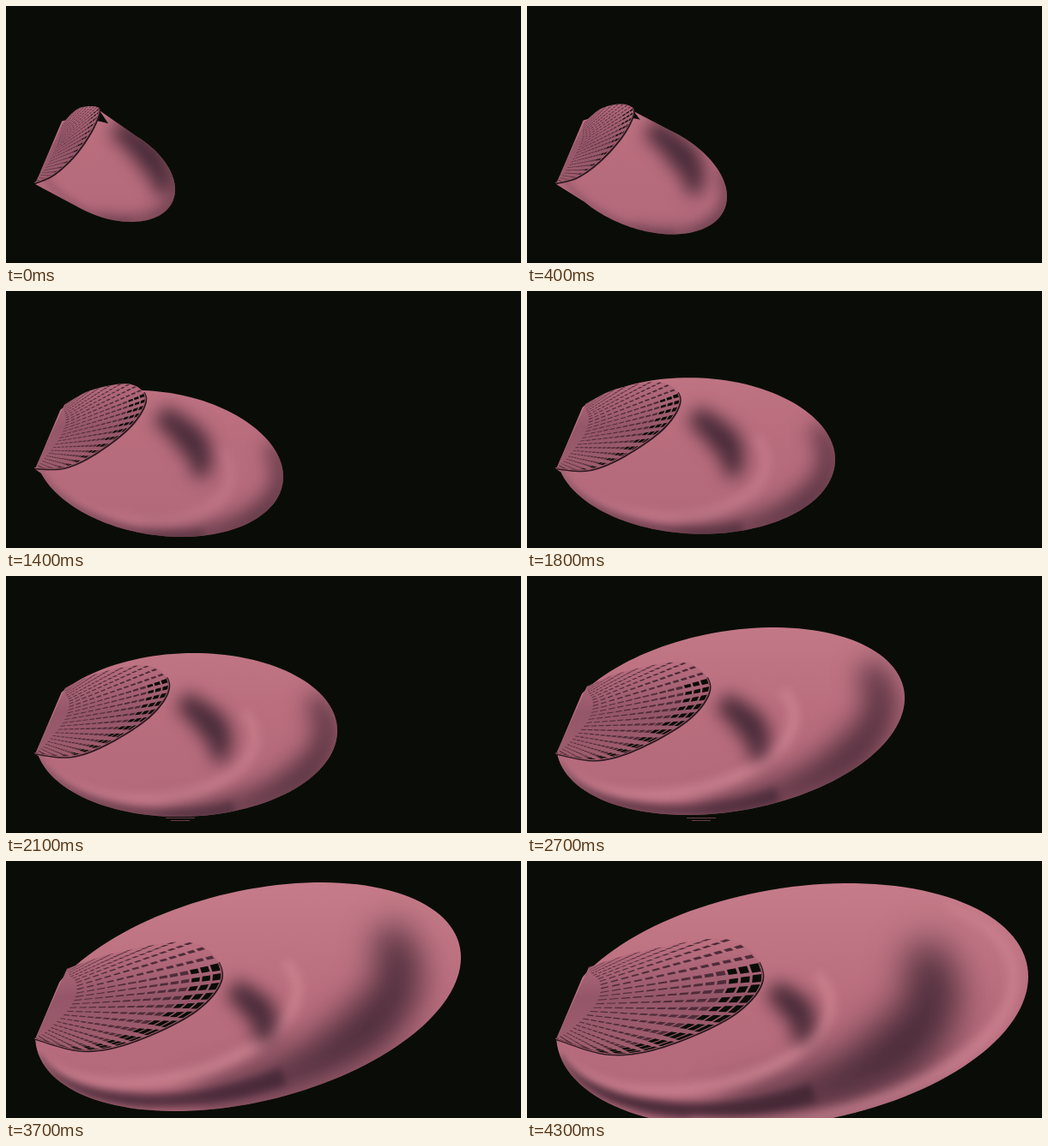
Recreate the animation shown at these times as an HTML page with a canvas. Size 600x300 px, loop 4400 ms.

```html
<!DOCTYPE html>
<html lang="en">
<head>
<meta charset="utf-8">
<title>Unfolding shell</title>
<style>
html, body { margin: 0; width: 100%; height: 100%; overflow: hidden; background: #0a0d07; }
canvas { display: block; }
</style>
</head>
<body>
<canvas id="stage" width="600" height="300"></canvas>
<script>
const ctx = document.getElementById('stage').getContext('2d');
const LOOP = 4400, STEP = 100, END = 4300;
const BLACK = '#0a0d07', DARK = '#432735', BRIGHT = '#d48a98';
const HINGE = [34, 208];

// Skewed ellipse of the outer edge: time, centre y, radius y, skew
const EDGE = [
  [0, 192, 60, -.38], [800, 203, 78, -.36], [1400, 201.5, 85.5, -.18], [2100, 185.5, 95.5, .05],
  [2700, 169.5, 109.5, .25], [3700, 158.5, 133.5, .35], [END, 169, 143, .24]
];
// Smooth curves as x,y pairs, at the start and at the end
const RIM = [
  [34,207, 56,197, 80,175, 100,146, 109,122, 99,117, 82,121, 66,137],
  [34,208, 98,226, 165,215, 245,177, 275,132, 235,91, 135,105, 72,124]
];
const CORE = [
  [128,140, 158,164, 178,190, 184,220],
  [284,150, 305,164, 322,186, 316,212]
];

const mix = (a, b, k) => a + (b - a) * k;
const mixAll = (a, b, k) => a.map((value, n) => mix(value, b[n], k));
const sample = (curve, count) => Array.from({ length: count + 1 }, (_, n) => curve(n / count));

// Catmull-Rom curve, u from 0 to 1
function spline(flat) {
  const last = flat.length / 2 - 1;
  return u => {
    const i = Math.min(last - 1, Math.floor(u * last)), k = u * last - i;
    return [0, 1].map(axis => {
      const p = n => flat[2 * Math.max(0, Math.min(last, n)) + axis];
      const a = p(i - 1), b = p(i), c = p(i + 1), d = p(i + 2);
      return b + k / 2 * (c - a + k * (2 * a - 5 * b + 4 * c - d + k * (3 * (b - c) + d - a)));
    });
  };
}

// Outer edge at an angle; smaller scales give inner rings through the hinge
function edgeAt(time) {
  const i = Math.max(1, EDGE.findIndex(row => row[0] >= time));
  const from = EDGE[i - 1], to = EDGE[i];
  const [, cy, ry, skew] = mixAll(from, to, (time - from[0]) / (to[0] - from[0]));
  const rx = 81.5 + .045 * time;
  return (angle, scale = 1) => mixAll(HINGE, [
    HINGE[0] + rx * (1 + Math.cos(angle)),
    cy - ry * Math.sin(angle + skew)
  ], scale);
}

function addPath(points) {
  points.forEach((p, n) => n ? ctx.lineTo(...p) : ctx.moveTo(...p));
}

function trace(points) {
  ctx.beginPath();
  addPath(points);
}

// Soft band whose width runs through three values
function ribbon(curve, widths, color, alpha, blur) {
  const points = sample(curve, 40), left = [], right = [];
  points.forEach(([x, y], n) => {
    const a = points[Math.max(0, n - 1)], b = points[Math.min(40, n + 1)];
    const dx = b[0] - a[0], dy = b[1] - a[1], u = n / 20;
    const w = u < 1 ? mix(widths[0], widths[1], u) : mix(widths[1], widths[2], u - 1);
    const k = w / 2 / (Math.hypot(dx, dy) || 1);
    left.push([x - dy * k, y + dx * k]);
    right.unshift([x + dy * k, y - dx * k]);
  });
  ctx.save();
  ctx.filter = `blur(${blur}px)`;
  ctx.globalAlpha = alpha;
  ctx.fillStyle = color;
  trace([...left, ...right]);
  ctx.fill();
  ctx.restore();
}

function gradient(y0, y1, ...colors) {
  const fill = ctx.createLinearGradient(0, y0, 0, y1);
  colors.forEach((c, n) => fill.addColorStop(n / (colors.length - 1), c));
  return fill;
}

function drawBody(time, rim) {
  const grow = time / END, edge = edgeAt(time);
  const ring = (scale, from, to) => u => edge(mix(from, to, u), scale);
  const shadeScale = 1.02 - .22 * grow ** 2, glowScale = 1 - .42 * grow ** .6;
  const width = 20 + 55 * grow ** 1.5, fold = 8 + 9 * grow;

  ctx.save();
  trace([[122, 0], HINGE, [-5, 300], [600, 300], [600, 0]]);
  ctx.clip();
  ctx.beginPath();
  addPath(sample(ring(1, Math.PI, -Math.PI), 140));
  addPath([rim(4 / 7), edge(1.1), edge(-.5)]);
  addPath([HINGE, rim(.4), edge(-1.9)]);
  ctx.fillStyle = gradient(30, 300, '#c57b89', '#b96d7d', '#b0687a');
  ctx.fill();
  ctx.clip();
  ribbon(ring(shadeScale, .45, -1.7), [width * .6, width, width * .35], DARK, .65 + .3 * grow, 4 + width * .24);
  ribbon(ring(glowScale, .45, -2.95), [10, 14, 5], BRIGHT, Math.min(.7, 1.1 * grow), 6);
  ribbon(ring(shadeScale, -1.2, -2.95), [fold * 1.3, fold, 3], DARK, .3 + .6 * grow, 4);
  ribbon(ring(.97, .8, -2), [6, 16, 14], BRIGHT, Math.max(0, grow - .85) * 4, 6);
  ribbon(spline(mixAll(...CORE, grow)), [22, 36, 16], DARK, .95, 10);
  ctx.restore();
}

function drawBasket(time, rim) {
  const grow = time / END, rows = 16, columns = 26;
  const inside = (v, s) => mixAll(mixAll(rim(0), rim(1), v), rim(v), s);
  const outline = sample(rim, 80);
  ctx.save();
  trace(outline);
  ctx.closePath();
  ctx.fillStyle = gradient(95, 225, '#bd7181', '#95566a', '#a05f6e');
  ctx.fill();
  ctx.clip();
  for (let i = 2; i < rows; i++) {
    for (let j = 0; j < columns; j++) {
      const s = (i + .5) / rows, v = (j + .5) / columns, lower = v < .6;
      const open = lower ? .22 + (.15 + .45 * grow) * s ** 4 : .28;
      const dv = open / 2 / columns, ds = (lower ? .38 : .34) / rows;
      ctx.fillStyle = lower && (s > .82 || v < .06) ? BLACK : '#4e2c39';
      trace([inside(v - dv, s - ds), inside(v + dv, s - ds), inside(v + dv, s + ds), inside(v - dv, s + ds)]);
      ctx.fill();
    }
  }
  ctx.restore();
  const front = outline.slice(0, 50);
  trace(front);
  ctx.lineWidth = 2.4;
  ctx.strokeStyle = '#2c1922';
  ctx.stroke();
  trace(front.map(([x, y]) => [x - .8, y - .8]));
  ctx.lineWidth = 1;
  ctx.strokeStyle = '#a9606f';
  ctx.stroke();
}

function draw(time) {
  const rim = spline(mixAll(...RIM, time / END));
  ctx.fillStyle = BLACK;
  ctx.fillRect(0, 0, 600, 300);
  drawBody(time, rim);
  drawBasket(time, rim);
  if (time >= 1900 && time < 3100) {
    ctx.fillStyle = '#633b49';
    ctx.fillRect(186, 282, 34, 1);
    ctx.fillRect(192, 285, 22, 1);
  }
}

function tick() {
  draw(Math.floor(performance.now() % LOOP / STEP) * STEP);
  requestAnimationFrame(tick);
}
tick();
</script>
</body>
</html>
```
